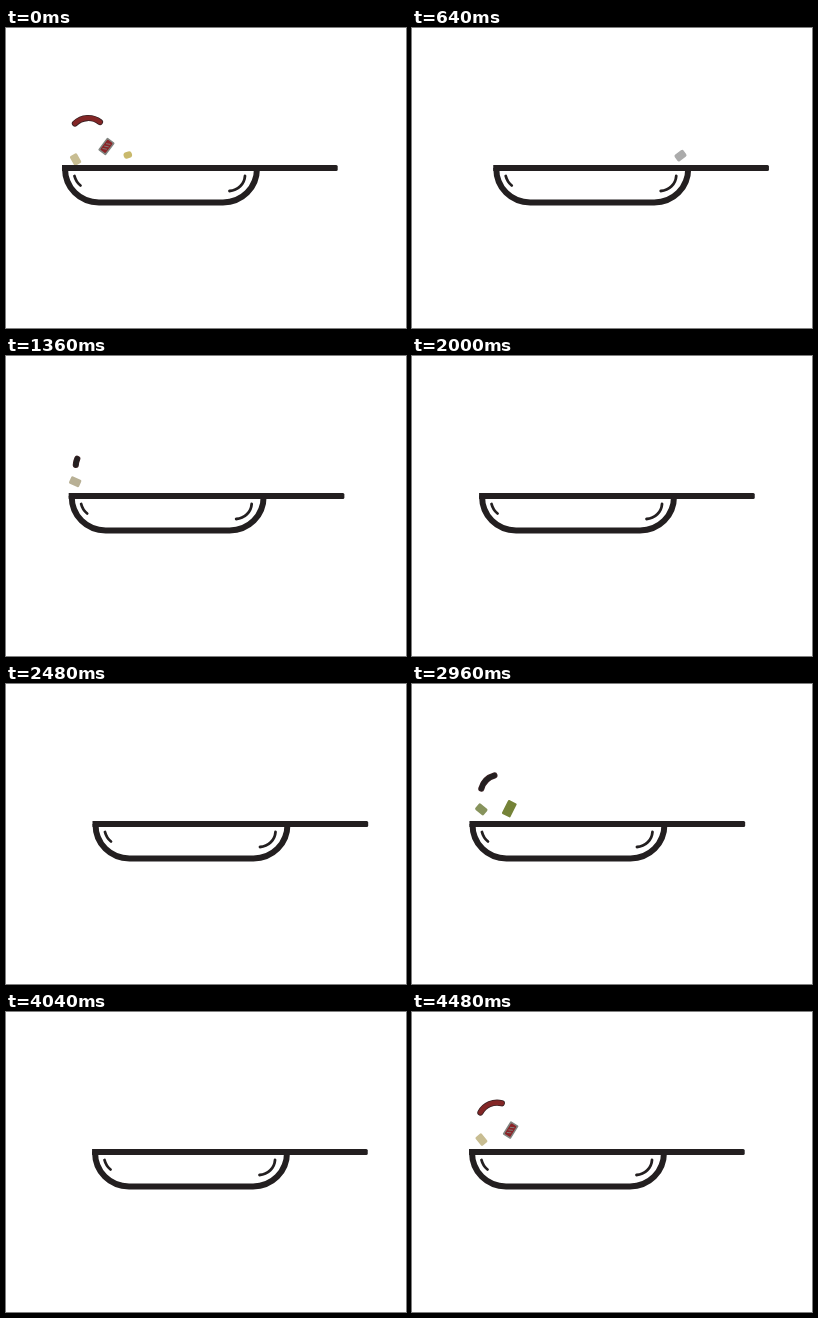
Write an HTML page with a canvas that moves like this. It is 400 by 300 pixels and loops after 4520 ms.

```html
<!DOCTYPE html>
<html lang="en">
<head>
<meta charset="utf-8">
<title>Frying pan</title>
<style>
html, body { margin: 0; width: 100%; height: 100%; overflow: hidden; background: #fff; }
canvas { display: block; }
</style>
</head>
<body>
<canvas id="stage" width="400" height="300"></canvas>
<script>
const ctx = document.getElementById('stage').getContext('2d');
const LOOP = 4520, STEP = 40, SWING = LOOP / 3, QUARTER = SWING / 4;
const RIGHTWARD = 526, LEFT_TOSS = RIGHTWARD + SWING / 2 - 100;
const INK = '#231f20';

// One set of colours per swing; a late batch leaves the pan after the others.
const batches = [
  { sausage: INK, slab: '#c9bf86', edge: '#aaa27e', chunk: '#b8b095', bean: '#c9b96c', cube: '#ababab', late: 0 },
  { sausage: INK, slab: '#758338', edge: '#758338', chunk: '#87935c', bean: '#87935c', cube: '#8d956f', late: 30 },
  { sausage: '#832626', slab: '#8b2428', edge: '#818581', chunk: '#c8bd92', bean: '#c9b96c', cube: '#c6bd95', late: 0 }
];

// Start and flight are in ms, turns in degrees.
const leftPieces = [
  { start: 14, flight: 692, from: 66, to: 140, rise: 60.5, turn: [-160, 186], draw: sausage },
  { start: 175, flight: 260, from: 96.5, to: 108, rise: 32.5, turn: [18, 50], draw: slab },
  { start: 0, flight: 434, from: 69, to: 70, rise: 25, turn: [-21, 87], draw: c => box(c.chunk, 11, 8, 1.5) },
  { start: 290, flight: 180, from: 121, to: 140, rise: 35, turn: [-30, 30], draw: c => box(c.bean, 8.5, 6.5, 3) }
];
const rightPieces = [
  { start: 60, flight: 260, from: 270, to: 235, rise: 34, turn: [-10, -137], draw: c => box(c.cube, 11, 8, 2) },
  { start: 130, flight: 280, from: 258, to: 225, rise: 33, turn: [0, -120], draw: c => box(c.chunk, 9, 7, 2) }
];

function cycle(t, start) {
  const d = (t - start + LOOP) % LOOP;
  return [Math.floor(d / SWING), d % SWING];
}

// Cubic ease in and out between both ends of the swing.
function panLeft(t) {
  const h = cycle(t, RIGHTWARD)[1] / QUARTER;
  const u = h < 1 ? h : h < 3 ? 2 - h : h - 4;
  return 70.8 + 15.8 * Math.sign(u) * (1 - (1 - Math.abs(u)) ** 3);
}

function toss(pieces, t, start) {
  const [n, time] = cycle(t, start), batch = batches[n];
  for (const p of pieces) {
    const u = (time - p.start - batch.late) / p.flight;
    if (u < 0 || u > 1) continue;
    const angle = (p.turn[0] + (p.turn[1] - p.turn[0]) * u) * Math.PI / 180;
    ctx.save();
    ctx.translate(p.from + (p.to - p.from) * u * u, 150 - 4 * p.rise * u * (1 - u));
    ctx.rotate(angle);
    p.draw(batch, angle);
    ctx.restore();
  }
}

function stroke(color, width, shape) {
  ctx.strokeStyle = color;
  ctx.lineWidth = width;
  ctx.beginPath();
  shape();
  ctx.stroke();
}

function box(color, w, h, r) {
  ctx.fillStyle = color;
  ctx.beginPath();
  ctx.roundRect(-w / 2, -h / 2, w, h, r);
  ctx.fill();
}

// Seen end-on when upright, at full length when level.
function sausage(c, angle) {
  const half = .72 * Math.max(.22, Math.cos(angle));
  const arc = () => ctx.arc(0, 19, 19, -Math.PI / 2 - half, -Math.PI / 2 + half);
  ctx.lineCap = 'round';
  stroke('#3a2224', 6.2, arc);
  stroke(c.sausage, 4.6, arc);
}

function slab(c) {
  box(c.edge, 9.5, 15.5, 1);
  box(c.slab, 6.5, 12.5, 1);
  ctx.lineCap = 'butt';
  stroke(c.edge, .8, () => {
    for (let y = -3; y <= 3; y += 3) {
      ctx.moveTo(-2, y + 1);
      ctx.lineTo(2, y - 1);
    }
  });
}

function food(t, x) {
  ctx.save();
  ctx.beginPath();
  ctx.rect(x, 0, 198, 140);
  ctx.clip();
  toss(leftPieces, t, LEFT_TOSS);
  toss(rightPieces, t, RIGHTWARD);
  ctx.restore();
}

function pan(x) {
  ctx.save();
  ctx.translate(x, 0);
  ctx.lineCap = 'butt';
  stroke(INK, 6, () => {
    ctx.moveTo(3, 140);
    ctx.bezierCurveTo(3, 160, 18, 174.4, 37, 174.4);
    ctx.lineTo(161, 174.4);
    ctx.bezierCurveTo(180, 174.4, 195, 160, 195, 140);
  });
  ctx.fillStyle = INK;
  ctx.beginPath();
  ctx.roundRect(0, 137, 275.7, 6, [0, 1.5, 1.5, 0]);
  ctx.fill();
  ctx.lineCap = 'round';
  stroke(INK, 2.8, () => {
    ctx.moveTo(12.5, 148);
    ctx.quadraticCurveTo(14, 154, 18.5, 157.5);
    ctx.moveTo(183, 148);
    ctx.bezierCurveTo(182.5, 156, 176, 162.5, 167.5, 163);
  });
  ctx.restore();
}

function frame() {
  const t = Math.floor(performance.now() % LOOP / STEP) * STEP;
  const x = panLeft(t);
  ctx.fillStyle = '#fff';
  ctx.fillRect(0, 0, 400, 300);
  food(t, x);
  pan(x);
  requestAnimationFrame(frame);
}
frame();
</script>
</body>
</html>
```
